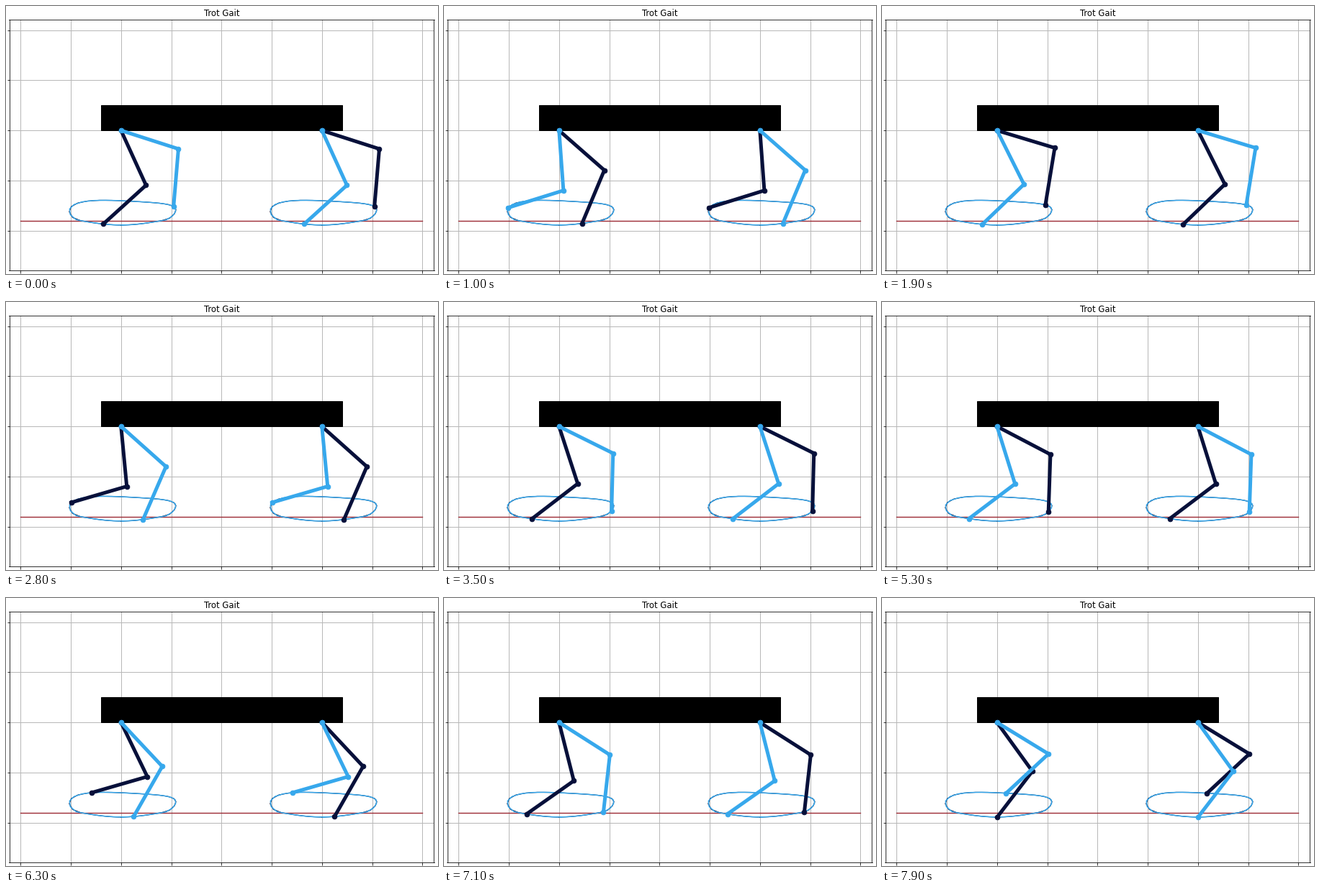
Write a matplotlib script that moves like this. It is 600x373 px and loops after 8000 ms.

```python
import math

import numpy as np
import matplotlib.pyplot as plt
from matplotlib.animation import FuncAnimation
from matplotlib.patches import Rectangle

W, H, DPI = 600, 373, 100
PX = 72 / DPI  # points per pixel
FRAMES, INTERVAL = 80, 100

DARK, LIGHT = "#07103a", "#37a8ec"
REAR, FRONT = 2, 6
THIGH, SHIN = 1.2, 1.15
SPAN, GROUND, SINK, LIFT = 0.8, -1.8, 0.086, 0.365
SWING = 0.46              # share of the cycle a foot spends in the air
HALF_STANCE = (1 - SWING) / 2
TOUCHDOWN, STRIDE = 31.8, 37.3   # in frames
RATE = 0.0274             # cycles per frame


def bezier(points, u):
    """Evaluate a Bezier curve by repeated interpolation."""
    while len(points) > 1:
        points = points[:-1] * (1 - u) + points[1:] * u
    return points[0]


SWING_X = SPAN * np.repeat([1, 1.4, 1.5, 0, -1.5, -1.4, -1],
                           [1, 1, 3, 3, 2, 1, 1])
SWING_Y = GROUND + LIFT * np.repeat([0, 1, 1.29, 0], [2, 5, 3, 2])


def gait_phase(i):
    """Steady clock that restarts at each touchdown of the dark rear foot."""
    since = (i - TOUCHDOWN) % STRIDE
    return min(since * RATE, 1) - HALF_STANCE


def foot(phase):
    """Foot position relative to the hip; phase 0 is mid stance."""
    p = (phase + HALF_STANCE) % 1 - HALF_STANCE
    if p <= HALF_STANCE:
        s = p / HALF_STANCE
        return SPAN * s, GROUND - SINK * math.cos(math.pi * s / 2)
    u = (p - HALF_STANCE) / SWING
    return bezier(SWING_X, u), bezier(SWING_Y, u)


def leg_points(hip, phase):
    """Hip, knee and foot, with the knee bent to the right."""
    fx, fy = foot(phase)
    d = math.hypot(fx, fy)
    bend = math.acos((THIGH**2 + d**2 - SHIN**2) / (2 * THIGH * d))
    a = math.atan2(fy, fx) + bend
    return ([hip, hip + THIGH * math.cos(a), hip + fx],
            [0, THIGH * math.sin(a), fy])


fig = plt.figure(figsize=(W / DPI, H / DPI), dpi=DPI, facecolor="white")
ax = fig.add_axes([4.5 / W, 5.3 / H, 590 / W, 348.7 / H])
ax.set_xlim(-0.2265, 8.2323)
ax.set_ylim(-2.787, 2.2108)
ax.set_xticks(range(9))
ax.set_yticks(range(-2, 3))
ax.tick_params(length=3.5 * PX, width=0.8 * PX,
               labelbottom=False, labelleft=False)
ax.grid(color="#b8b8b8", lw=PX)
ax.set_axisbelow(True)
for spine in ax.spines.values():
    spine.set_linewidth(0.8 * PX)
ax.set_title("Trot Gait", fontname="DejaVu Sans", fontsize=11.6 * PX,
             pad=4.6 * PX)

ax.add_patch(Rectangle((1.6, 0), 4.8, 0.5, fc="black", ec="black",
                       lw=PX, zorder=2))
ax.plot([0, 8], [GROUND, GROUND], color="#9c2a34", lw=1.4 * PX, zorder=3)

for hip in (REAR, FRONT):
    for color, width, shift in ((DARK, 1.2, 0), (LIGHT, 1.5, 0.5)):
        x, y = np.transpose([foot((i + shift) / 37) for i in range(38)])
        ax.plot(hip + x, y, color=color, lw=width * PX, zorder=4)

legs = []
for color, offset in ((DARK, 0), (LIGHT, 0.5)):
    for hip, lag in ((REAR, 0), (FRONT, 0.5)):
        line, = ax.plot([], [], "o-", color=color, lw=5 * PX, ms=6.6 * PX,
                        mew=PX, solid_joinstyle="round", zorder=5)
        legs.append((line, hip, offset + lag))


def draw(i):
    phase = gait_phase(i)
    for line, hip, offset in legs:
        line.set_data(*leg_points(hip, phase + offset))
    return [line for line, _, _ in legs]


anim = FuncAnimation(fig, draw, frames=FRAMES, interval=INTERVAL,
                     repeat=True, repeat_delay=0)
plt.show()
```
